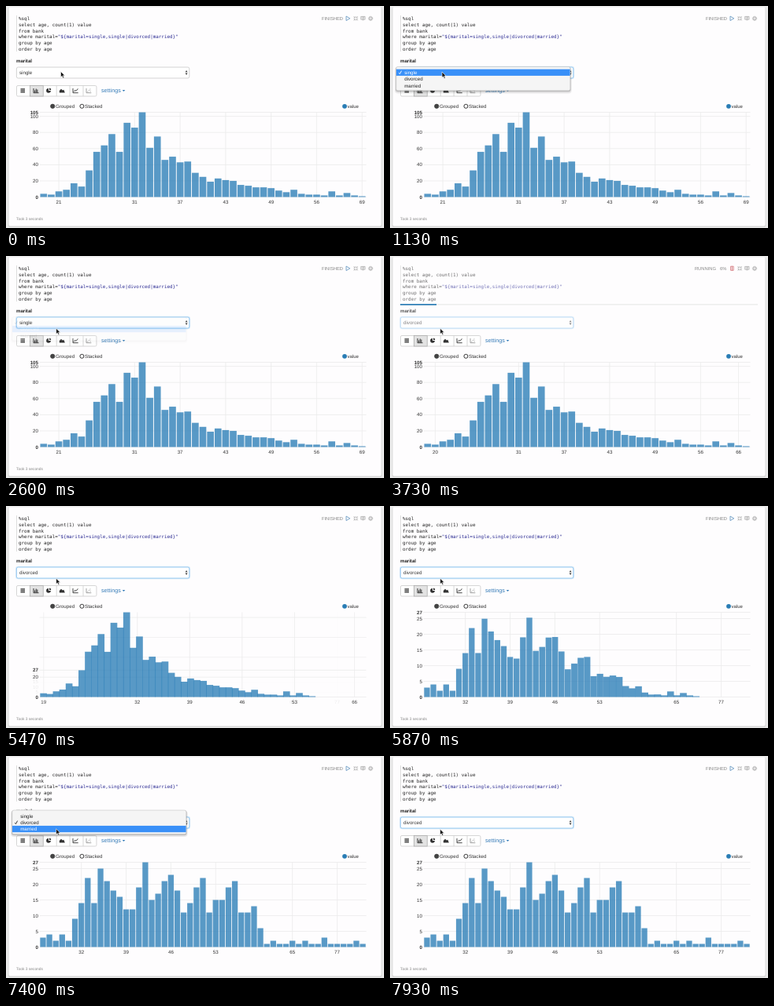
These frames come from a looping animation (480x283 px, 8000 ms). An HTML page:

```html
<!DOCTYPE html>
<html lang="en">
<head>
<meta charset="utf-8">
<title>Query with a select form</title>
<style>
  html, body { margin: 0; width: 100%; height: 100%; overflow: hidden; background: #ececec; }
  svg { display: block; width: 100vw; height: 100vh; }
  text { font-family: "Liberation Sans", Arial, sans-serif; font-size: 6.2px; fill: #333; text-rendering: geometricPrecision; white-space: pre; }
  .code text { font-family: "DejaVu Sans Mono", monospace; font-size: 5.92px; fill: #222; }
  .code .string { fill: #2a2a92; }
  .bold { font-weight: bold; }
  .grid { stroke: #ebebeb; stroke-width: .8; }
  .bar { fill: #1f77b4; fill-opacity: .74; }
</style>
</head>
<body>
<svg viewBox="0 0 480 283">
  <rect width="480" height="283" fill="#ececec"/>
  <rect x="2.5" y="2" width="475" height="280" rx="2" fill="#d9d9d9"/>
  <rect x="3.5" y="1.5" width="473" height="279" rx="2" fill="#fefdfe"/>
  <g id="code" class="code"></g>
  <g id="status"></g>
  <g id="form"></g>
  <g id="tools"></g>
  <g id="legend">
    <circle cx="59.2" cy="127.8" r="2.7" fill="#444" stroke="#333" stroke-width=".6"/>
    <text x="63" y="129.9">Grouped</text>
    <circle cx="96.4" cy="127.8" r="2.5" fill="#fff" stroke="#333" stroke-width="1"/>
    <text x="100" y="129.9">Stacked</text>
    <circle cx="430" cy="127.8" r="2.9" fill="#2a7db5"/>
    <text x="433.6" y="129.9" style="font-size:6px">value</text>
  </g>
  <clipPath id="plot"><rect x="42" y="135" width="416" height="109"/></clipPath>
  <g id="chart"></g>
  <text id="took" x="13" y="272.9" style="font-size:4.9px;fill:#888">Took 3 seconds</text>
  <g id="popup"></g>
  <path id="cursor" d="M0 0V7.2L1.7 5.7L2.9 8.4L4.2 7.8L3 5.2H5.2Z" fill="#111" stroke="#fff" stroke-width=".6"/>
</svg>
<script>
const LOOP = 8000;
const RUN = 2800, REDRAW = 3000, DONE = 5335;
const LEFT = 42.5, WIDTH = 415, BASE = 243.5, HEIGHT = 108;
const OPTIONS = ['single', 'divorced', 'married'];

const single = {
  max: 105,
  values: [4, 3, 7, 9, 17, 13, 33, 56, 64, 78, 56, 92, 86, 105, 61, 75, 46, 50, 43, 44, 30, 25,
    19, 23, 21, 20, 15, 14, 12, 12, 11, 8, 6, 9, 4, 3, 3, 2, 7, 2, 5, 2, 1]
};
const divorced = {
  max: 27,
  values: [3, 4, 2, 4, 2, 9, 14, 22, 14, 25, 21, 18, 16, 12, 12, 19, 27, 15, 17, 21, 23, 18, 11, 14,
    19, 22, 11, 15, 15, 19, 21, 11, 11, 13, 6, 1, 2, 1, 1, 2, 1, 2, 1, 1, 3, 1, 1, 1, 1, 2, 1]
};

const $ = id => document.getElementById(id);
const clamp = v => Math.max(0, Math.min(1, v));
const mix = (a, b, p) => a + (b - a) * p;
const cubic = p => p < .5 ? 4 * p ** 3 : 1 - 4 * (1 - p) ** 3;
const smooth = p => p * p * (3 - 2 * p);
const phase = (t, start, length) => clamp((t - start) / length);

// Each step is [time, ...values].
function track(steps, t, ease = smooth) {
  const next = steps.findIndex(s => s[0] > t);
  if (next < 0) return steps.at(-1).slice(1);
  if (next === 0) return steps[0].slice(1);
  const a = steps[next - 1], b = steps[next];
  const p = ease((t - a[0]) / (b[0] - a[0]));
  return a.slice(1).map((v, i) => mix(v, b[i + 1], p));
}

const pointer = [[0, 69.5, 83.5], [100, 69.5, 83.5], [600, 66, 84], [1550, 66, 84], [1880, 64.6, 90.6],
  [2100, 64.6, 90.6], [2350, 63.7, 92.2], [6150, 63.7, 92.2], [6550, 64.5, 84.6],
  [7050, 64.5, 84.6], [7450, 63.6, 93.2]];
const progress = [[3050, 0], [3350, 18], [3730, 46], [4150, 55], [4700, 165], [5000, 240], [5330, 310]];
const percents = [[RUN, 0], [3400, 6], [4250, 33], [4800, 60]];

const text = (x, y, s, attrs = '') => `<text x="${x}" y="${y}" ${attrs}>${s}</text>`;
const line = (x1, y1, x2, y2, opacity = 1) =>
  `<path class="grid" opacity="${opacity}" d="M${x1} ${y1}L${x2} ${y2}"/>`;
const shape = (d, fill) => `<path d="${d}" fill="${fill}"/>`;
const stroke = (d, color, width = .8) => `<path d="${d}" fill="none" stroke="${color}" stroke-width="${width}"/>`;

function drawCode() {
  const lines = ['%sql', 'select age, count(1) value', 'from bank',
    'where marital=<tspan class="string">"${marital=single,single|divorced|married}"</tspan>',
    'group by age', 'order by age'];
  $('code').innerHTML = stroke('M13.5 12V58', '#ddd', 1) +
    lines.map((s, i) => text(16, 18 + i * 7.75, s)).join('');
}

function drawTools() {
  const edge = i => 13.5 + i * 16.9;
  const icons = [
    stroke('M18.5 105.8H24M18.5 107.8H24M18.5 109.8H24', '#333', 1.2),
    stroke('M35 105V110.7H41.5M36.7 110V107.5M38.2 110V105.5M39.8 110V106.5', '#333', 1),
    shape('M54 105A2.9 2.9 0 1 0 56.9 108H54ZM55 104.5V107H57.3A2.5 2.5 0 0 0 55 104.5Z', '#333'),
    shape('M67.8 110.4V108L70 105.8L72 107.4L73.4 106.8L74.8 110.4Z', '#333'),
    stroke('M85 105V110.7H91.7M86 109.4L87.7 107.3L89 108.4L91.3 105.4', '#333', .9),
    stroke('M102 105V110.7H108.3M103.4 109.2H104.4M104.8 107.4H105.8M106.6 108.6H107.6M106.4 106H107.4', '#888')
  ];
  let out = `<rect x="13.5" y="101.5" width="101.4" height="13.5" rx="1.5" fill="#fff" stroke="#ccc" stroke-width=".8"/>
    <rect x="${edge(1)}" y="101.5" width="16.9" height="13.5" fill="#e3e3e3" stroke="#adadad" stroke-width=".8"/>`;
  for (let i = 2; i < 6; i++) out += stroke(`M${edge(i)} 101.5V115`, '#ccc');
  $('tools').innerHTML = out + icons.join('') +
    text(121, 110.3, 'settings', 'style="font-size:7.2px;fill:#337ab7"') +
    shape('M147.7 107H151.3L149.5 109Z', '#337ab7');
}

function drawStatus(t, running) {
  const gray = 'style="font-size:5.8px;fill:#888" text-anchor="end"';
  let out = '';
  if (running) {
    const percent = percents.filter(s => s[0] <= t).at(-1)[1];
    out = text(414, 18, 'RUNNING', gray) + text(427.5, 18, percent + '%', gray) +
      stroke('M432.6 13.2H436.2V18.3H432.6ZM434.4 13.2V18.3', '#d9878c', 1) +
      `<rect x="13" y="61" width="454" height="1.6" fill="#eeeeee"/>` +
      `<rect x="13" y="61" width="${track(progress, t, p => p)[0]}" height="1.8" fill="#3683b9"/>`;
  } else {
    out = text(428, 18, 'FINISHED', gray) + stroke('M432 13L436.8 15.8L432 18.6Z', '#5a8fbd');
  }
  const icon = '#a4a4a4';
  out += stroke('M441.6 13.4L443.2 15V13.4M443.2 15H441.6M446.6 13.4L445 15V13.4M445 15H446.6' +
    'M441.6 18.4L443.2 16.8V18.4M443.2 16.8H441.6M446.6 18.4L445 16.8V18.4M445 16.8H446.6', icon, .7) +
    stroke('M450.7 13.4H456V17.2H450.7ZM453.3 13.4V18.6M451.6 14.6H452.5M454.1 14.6H455.1M451.6 16H452.5M454.1 16H455.1', icon, .7) +
    `<circle cx="463" cy="15.9" r="2" fill="none" stroke="${icon}" stroke-width=".9"/>
     <circle cx="463" cy="15.9" r="2.7" fill="none" stroke="${icon}" stroke-width=".7" stroke-dasharray="1.06"/>
     <circle cx="463" cy="15.9" r=".6" fill="${icon}"/>`;
  $('status').innerHTML = out;
}

function drawForm(t, running) {
  const focus = t >= 1000;
  const dim = running ? .6 : 1;
  const box = 'x="13.4" y="78" width="219.4" height="14" rx="2"';
  const glow = focus ? `<rect ${box} fill="none" stroke="#66afe9" stroke-opacity=".25" stroke-width="2.6"/>` : '';
  $('form').innerHTML = text(13, 72.3, 'marital', `class="bold" style="font-size:6.1px;fill:#222" opacity="${running ? .75 : 1}"`) +
    `<g opacity="${dim}">${glow}<rect ${box} fill="#fff" stroke="${focus ? '#84bfec' : '#c8c8c8'}" stroke-width=".8"/>` +
    text(17, 87, OPTIONS[t < 2670 ? 0 : 1]) +
    shape('M227.6 84.3L229.1 82L230.6 84.3ZM227.6 85.6L229.1 87.9L230.6 85.6Z', '#444') + '</g>';
}

function drawPopup(t, cursorY) {
  const second = t > 5000;
  const chosen = second ? 1 : 0;
  const [open, click, gone] = second ? [6900, 7620, 7860] : [1000, 2400, 2620];
  if (t < open || t >= gone) { $('popup').innerHTML = ''; return; }
  const row = 8.3, top = 78 - chosen * row, first = top + 2.6;
  const hover = Math.max(0, Math.min(2, Math.floor((cursorY - first) / row)));
  const flash = t >= click && t < click + 60;
  let out = `<rect x="6" y="${top}" width="224.6" height="33.4" rx="4" fill="#000" opacity=".08"/>
    <rect x="7" y="${top - .4}" width="222.6" height="32" rx="3" fill="#000" opacity=".18"/>
    <rect x="7.8" y="${top - .6}" width="221" height="30.4" rx="2.2" fill="#f5f5f5" stroke="#c4c4c4" stroke-width=".6"/>`;
  OPTIONS.forEach((name, i) => {
    const y = first + i * row, lit = i === hover && !flash;
    const color = `style="fill:${lit ? '#fff' : '#222'}"`;
    if (lit) out += `<rect x="8" y="${y}" width="220.6" height="${row}" fill="#3990f8"/>`;
    out += text(18.2, y + 6.3, name, color);
    if (i === chosen) out += stroke(`M11.2 ${y + 4.6}L12.5 ${y + 6}L14.6 ${y + 2}`, lit ? '#fff' : '#222', .9);
  });
  const fade = 1 - phase(t, click + 60, gone - click - 60);
  $('popup').innerHTML = `<g opacity="${fade}">${out}</g>`;
}

const step = data => WIDTH / (data.values.length + .1);
const slot = (data, i) => LEFT + step(data) * (i + .1);
const centre = (data, i) => slot(data, i) + step(data) * .45;
const rise = (data, v) => v / data.max * HEIGHT;

function xTick(x, label, opacity = 1) {
  return line(x, 135.5, x, BASE, opacity) + text(x, 251.5, label, `text-anchor="middle" opacity="${opacity}"`);
}

function yTick(v, h, opacity, bold, label = true) {
  if (h > HEIGHT + .5) return '';
  const y = BASE - h;
  return line(LEFT, y, LEFT + WIDTH, y, opacity) +
    (label ? text(41, y + 2, v, `text-anchor="end" opacity="${opacity}" ${bold ? 'class="bold"' : ''}`) : '');
}

function axes(t) {
  const p = cubic(phase(t, DONE, 500));
  let out = '';
  if (t < DONE) {
    const ends = t < REDRAW ? [[2, 21], [42, 69]] : [[1, 20], [41, 66]];
    for (const [i, age] of [...ends, [12, 31], [18, 37], [24, 43], [30, 49], [36, 56]])
      out += xTick(centre(single, i), age);
    for (const v of [0, 20, 40, 60, 80, 100, 105]) out += yTick(v, rise(single, v), 1, v % 105 === 0);
    return out;
  }
  // Shared ages slide from their old place to their new one; the rest fade.
  for (const [from, to, age] of [[13, 6, 32], [20, 13, 39], [27, 20, 46], [34, 27, 53]])
    out += xTick(mix(centre(single, from), centre(divorced, to), p), age);
  if (p < 1) out += xTick(centre(single, 0), 19, 1 - p) + xTick(centre(single, 41), 66, 1 - p);
  out += xTick(centre(divorced, 39), 65, p) + xTick(centre(divorced, 46), 77, p);
  const slide = v => mix(rise(single, v), rise(divorced, v), p);
  for (const v of [0, 5, 10, 15, 20, 25, 27])
    out += yTick(v, slide(v), v % 20 === 0 || v === 27 ? 1 : p, v % 27 === 0);
  if (p < 1) for (const v of [40, 60, 80]) out += yTick(v, slide(v), 1 - p, false, false);
  return out;
}

function bars(t) {
  const changed = t >= DONE;
  const data = changed ? divorced : single;
  const count = data.values.length;
  return data.values.map((v, i) => {
    const old = single.values[i] || 0;
    const p = changed ? cubic(phase(t, DONE + i * 600 / count, 500)) : 1;
    const h = changed ? mix(rise(single, old), rise(divorced, v), p) : rise(single, v);
    const w = changed ? mix(step(single), step(divorced), p) * .9 : step(single) * .9;
    return `<rect class="bar" x="${slot(data, i)}" y="${BASE - h}" width="${w}" height="${h}"/>`;
  }).join('');
}

function render(t) {
  const running = t >= RUN && t < DONE;
  const [x, y] = track(pointer, t);
  $('code').setAttribute('opacity', running ? .65 : 1);
  $('took').setAttribute('opacity', running ? 0 : 1);
  drawStatus(t, running);
  drawForm(t, running);
  drawPopup(t, y);
  $('chart').innerHTML = axes(t) + `<g clip-path="url(#plot)">${bars(t)}</g>`;
  $('cursor').setAttribute('transform', `translate(${x} ${y})`);
}

drawCode();
drawTools();
const begin = performance.now();
function frame() {
  render((performance.now() - begin) % LOOP);
  requestAnimationFrame(frame);
}
frame();
</script>
</body>
</html>
```
